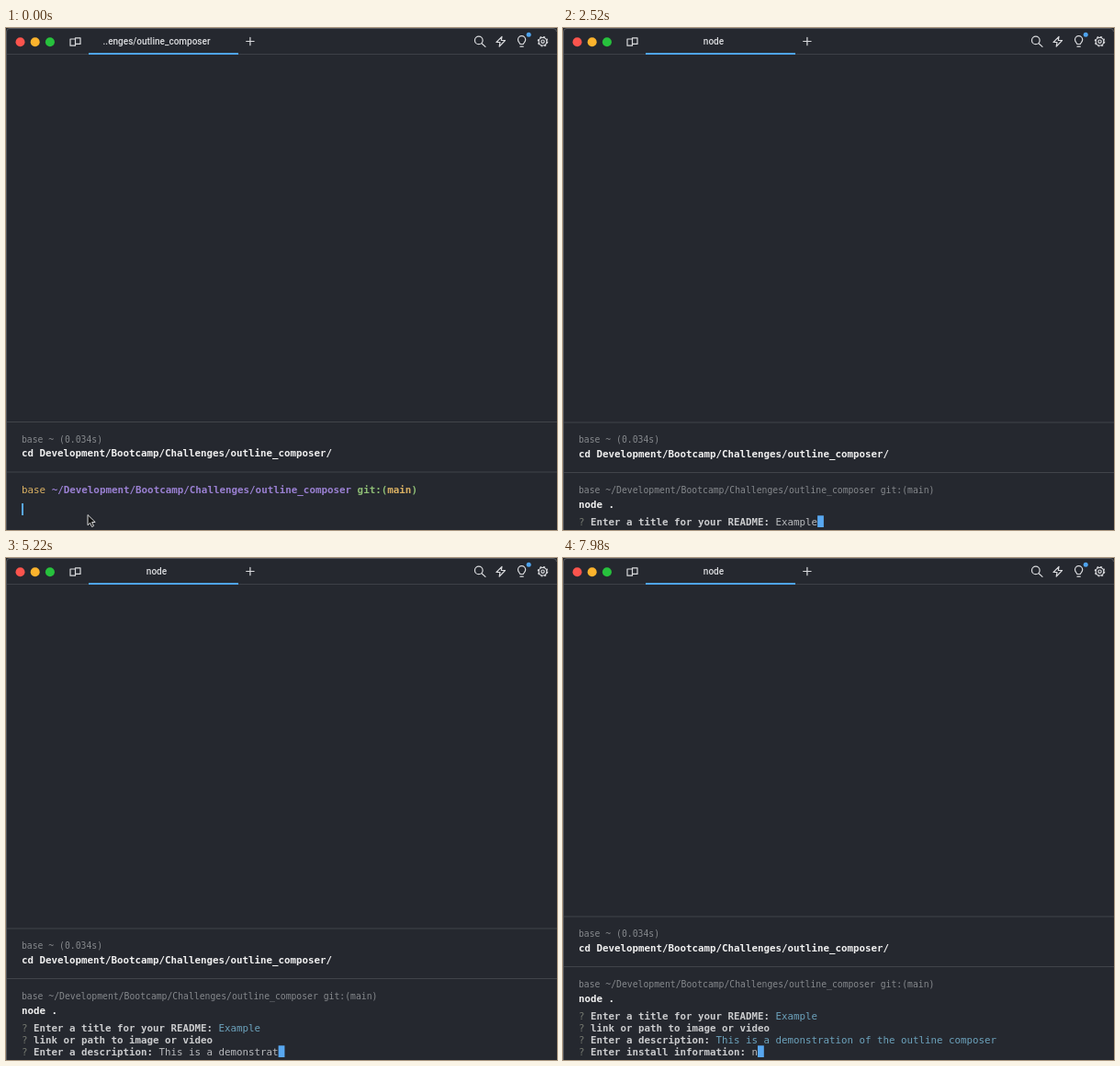
An HTML page for the animation above (8000 ms loop, 600 by 546 pixels).

```html
<!DOCTYPE html>
<html lang="en">
<head>
<meta charset="utf-8">
<title>Terminal session</title>
<style>
  html, body { margin: 0; width: 100%; height: 100%; overflow: hidden; background: #25282f; }
  svg { display: block; width: 600px; height: 546px; }
  text { white-space: pre; font: 10.815px "DejaVu Sans Mono", monospace; fill: #b9bbbe; }
  .tab { font: 500 10px Roboto, sans-serif; fill: #dcdde0; text-anchor: middle; }
  .label { font-size: 9.765px; fill: #85888c; }
  .command { font-weight: bold; fill: #f1f1f1; }
  .prompt { font-size: 10.85px; }
  .ask { font-weight: bold; fill: #cbccce; }
  .mark { fill: #74786f; }
  .answer { fill: #6ca2bc; }
  .amber { fill: #dbb163; }
  .purple { fill: #9a80d2; }
  .green { fill: #8fbf76; }
  .bold { font-weight: bold; }
  .icon { fill: none; stroke: #d9dadd; stroke-width: 1.2; stroke-linejoin: round; stroke-linecap: round; }
</style>
</head>
<body>
<svg viewBox="0 0 600 546">
  <rect width="600" height="546" fill="#25282f"/>
  <g id="terminal"></g>
  <path id="pointer" d="M89 529.5v11.2l2.6-2.4 1.9 4.2 2-.9-1.9-4.1h3.6z" fill="#111" stroke="#eee" stroke-width=".9"/>

  <path d="M0 28.5H600" stroke="#3d4047"/>
  <path d="M.5 546V4Q.5.5 4 .5H596Q599.5.5 599.5 4" fill="none" stroke="#56585d"/>
  <circle cx="15.5" cy="15.3" r="5" fill="#fb544d"/>
  <circle cx="31.7" cy="15.3" r="5" fill="#fcb32d"/>
  <circle cx="47.9" cy="15.3" r="5" fill="#27c13d"/>
  <rect x="90" y="27" width="163" height="2" fill="#4fa4ee"/>
  <text class="tab" id="title" x="164" y="18.3"></text>
  <g class="icon">
    <path d="M75.5 12H70v7.2h5.5zM75.5 10.8H81v6.6h-5.5z"/>
    <path d="M261.7 14.5h8.4M265.9 10.3v8.4"/>
    <circle cx="514.8" cy="13.4" r="4.3"/>
    <path d="M518 16.7l4 3.7"/>
    <path d="M540 9.3l-6 6.2h4l-.8 4.6 6.3-6.6h-4.2z"/>
    <path d="M559.8 17.5c0-1.5-2.3-2.2-2.3-4.7a4.1 4.1 0 0 1 8.2 0c0 2.5-2.3 3.2-2.3 4.7zM560 20.2h3.2"/>
    <circle cx="584.5" cy="14.7" r="4.3"/>
    <circle cx="584.5" cy="14.7" r="1.7"/>
    <circle cx="584.5" cy="14.7" r="5.2" stroke-linecap="butt" stroke-dasharray="2 2.084"/>
  </g>
  <circle cx="569.2" cy="7.2" r="2.5" fill="#4fa4ee"/>
</svg>
<script>
const LOOP = 8000, LEFT = 17, CHAR = 6.51, ROW = 13, BLUE = "#58a7f0";
const FOLDER = "Development/Bootcamp/Challenges/outline_composer";
const TYPING = 300, RUN = 960;

// Each question appears at `at`; its answer is typed from `start`, one character per `step` ms.
const questions = [
  { at: 1260, ask: "Enter a title for your README:", answer: "Example", start: 1860, step: 75 },
  { at: 2760, ask: "link or path to image or video", answer: "", start: 3000, step: 60 },
  { at: 3840, ask: "Enter a description:", answer: "This is a demonstration of the outline composer", start: 4490, step: 36 },
  { at: 6420, ask: "Enter install information:", answer: "n", start: 7740, step: 60 },
];

const byId = id => document.getElementById(id);
const span = (cls, s) => `<tspan class="${cls}">${s}</tspan>`;
const line = (y, s, cls = "") => `<text class="${cls}" x="${LEFT}" y="${y}">${s}</text>`;
const rule = y => `<path d="M1 ${y}H600" stroke="#41444a"/>`;
const block = (x, y, w, h) => `<rect x="${x}" y="${y}" width="${w}" height="${h}" fill="${BLUE}"/>`;
const typed = (s, t, start, step) => s.slice(0, Math.max(0, Math.floor((t - start) / step)));

function firstCommand(y) {
  return rule(y) + line(y + 22, "base ~ (0.034s)", "label") +
    line(y + 37.5, `cd ${FOLDER}/`, "command") + rule(y + 54.5);
}

function promptScreen(t) {
  const input = typed("node .", t, TYPING, 90);
  const prompt = span("amber", "base ") + span("purple bold", `~/${FOLDER} `) +
    span("green bold", "git:(") + span("amber bold", "main") + span("green bold", ")");
  return firstCommand(428.5) + line(505.7, prompt, "prompt") +
    line(527, span("green", input.slice(0, 4)) + input.slice(4)) +
    block(LEFT + input.length * CHAR, 517, 2, 13);
}

function runningScreen(t) {
  const shown = questions.filter(q => t >= q.at);
  const top = 429 - (shown.length - 1) * ROW;
  let out = firstCommand(top) +
    line(top + 77, `base ~/${FOLDER} git:(main)`, "label") +
    line(top + 92.5, "node .", "command");
  shown.forEach((q, i) => {
    const active = i === shown.length - 1;
    const reply = active ? typed(q.answer, t, q.start, q.step) : q.answer;
    const y = 540.7 - (shown.length - 1 - i) * ROW;
    out += line(y, span("mark", "? ") + span("ask", q.ask + " ") + span(active ? "" : "answer", reply));
    if (active) out += block(LEFT + (q.ask.length + 3 + reply.length) * CHAR - .3, 530.3, 6.8, 12.7);
  });
  return out;
}

let current = "";
function draw(now) {
  const t = now % LOOP;
  const running = t >= RUN;
  const screen = running ? runningScreen(t) : promptScreen(t);
  if (screen !== current) byId("terminal").innerHTML = current = screen;
  byId("title").textContent = running ? "node" : "..enges/outline_composer";
  byId("pointer").style.display = t < TYPING + 90 ? "" : "none";
}

const begin = performance.now();
function tick() {
  draw(performance.now() - begin);
  requestAnimationFrame(tick);
}
tick();
</script>
</body>
</html>
```
